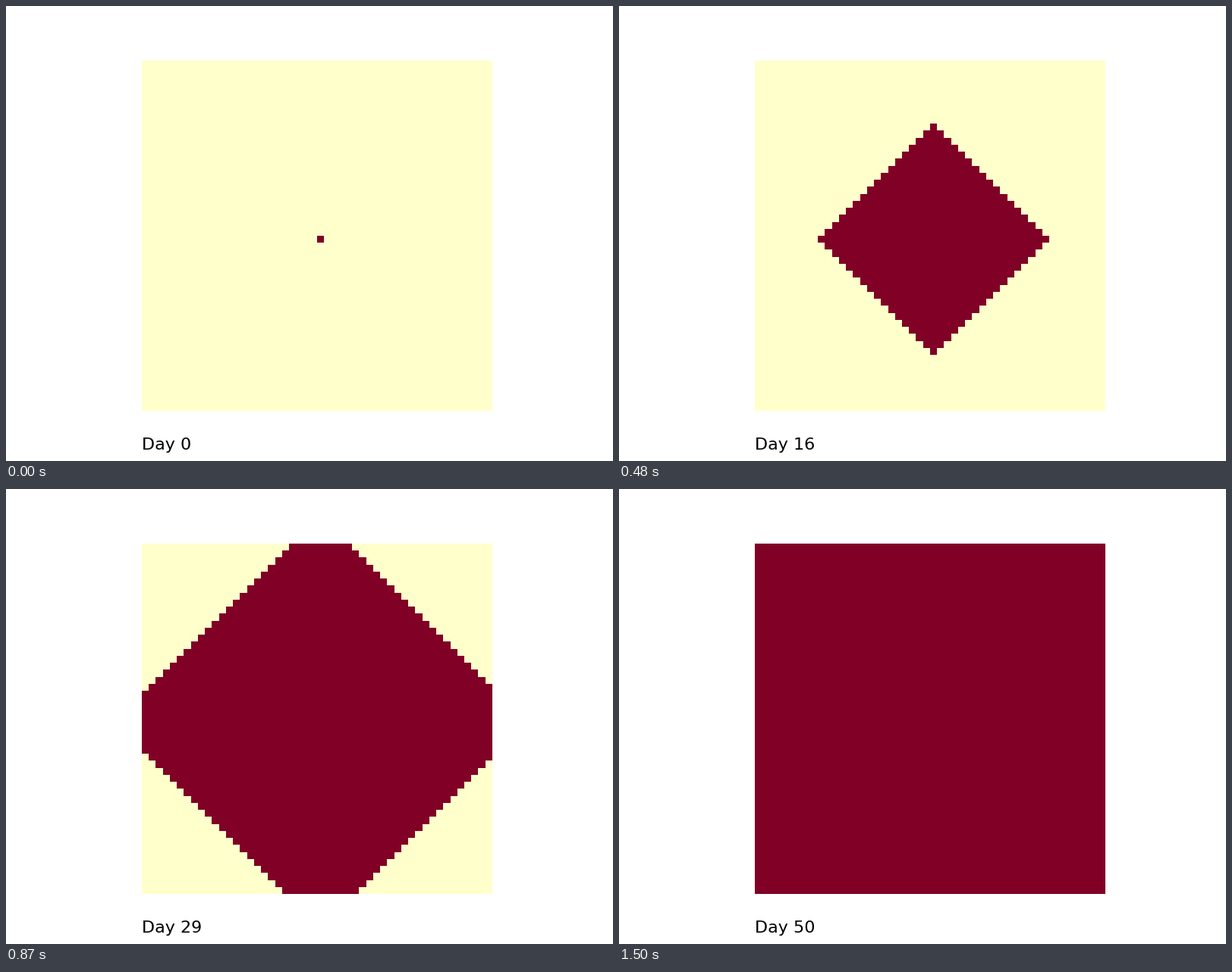
Recreate the animation shown at these times as a matplotlib script. Size 800 px wide and 600 px high, loop 1530 ms.

```python
import numpy as np
import matplotlib.pyplot as plt
from matplotlib.animation import FuncAnimation

SIZE = 50
DAYS = 51
INTERVAL = 30

fig, ax = plt.subplots(figsize=(8, 6), dpi=100)
ax.axis("off")

# Steps needed to reach each cell from the first infected one
rows, cols = np.indices((SIZE, SIZE))
distance = abs(rows - SIZE // 2) + abs(cols - SIZE // 2)

grid = ax.imshow(distance <= 0, cmap="YlOrRd", vmin=0, vmax=1,
                 interpolation="nearest")
label = ax.text(-0.5, 55, "Day 0", fontsize=16, family="DejaVu Sans")


def update(day):
    grid.set_data((distance <= day).astype(float))
    label.set_text(f"Day {day}")
    return grid, label


anim = FuncAnimation(fig, update, frames=DAYS, interval=INTERVAL,
                     repeat=True, repeat_delay=0)
plt.show()
```
